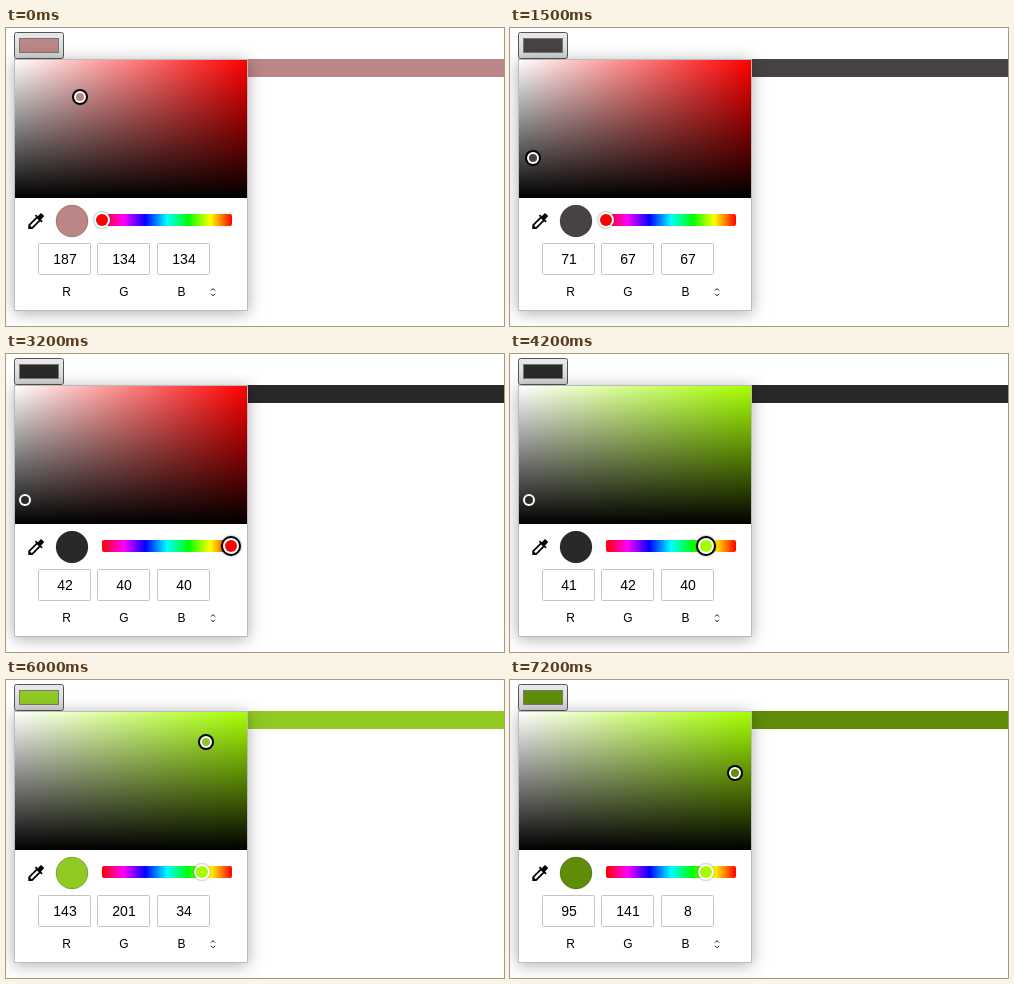
Write an HTML page that moves like this. It is 498 by 298 pixels and loops after 8000 ms.

```html
<!DOCTYPE html>
<html lang="en">
<head>
<meta charset="utf-8">
<title>Colour picker</title>
<style>
  html, body { margin: 0; width: 100%; height: 100%; overflow: hidden; background: #fff; }
  svg { display: block; }
  text { font: 14px "Liberation Sans", Arial, sans-serif; text-anchor: middle; }
  .label { font-size: 12px; }
  .panel { filter: drop-shadow(0 2px 8px rgba(0, 0, 0, .32)); }
  .tint { fill: var(--color); }
  .hue { fill: var(--hue); }
  .box { fill: #fff; stroke: #c4c4c4; }
  .knob { filter: drop-shadow(0 0 1px rgba(0, 0, 0, .5)); }
</style>
</head>
<body>
<svg id="stage" width="498" height="298" viewBox="0 0 498 298">
  <defs>
    <linearGradient id="white"><stop stop-color="#fff"/><stop offset="1" stop-color="#fff" stop-opacity="0"/></linearGradient>
    <linearGradient id="black" x2="0" y2="1"><stop stop-opacity="0"/><stop offset="1"/></linearGradient>
    <linearGradient id="rainbow"></linearGradient>
    <linearGradient id="button" x2="0" y2="1"><stop stop-color="#e9e9e9"/><stop offset="1" stop-color="#d6d6d6"/></linearGradient>
  </defs>

  <rect class="tint" x="8" y="31" width="490" height="18"/>
  <rect x="8.5" y="4.5" width="49" height="26" rx="2" fill="url(#button)" stroke="#555"/>
  <rect class="tint" x="13.5" y="10.5" width="39" height="14" stroke="#777"/>

  <rect class="panel" x="8" y="31" width="234" height="252" rx="1" fill="#bbb"/>
  <rect x="9" y="32" width="232" height="250" fill="#fff"/>
  <rect class="hue" x="9" y="32" width="232" height="138"/>
  <rect x="9" y="32" width="232" height="138" fill="url(#white)"/>
  <rect x="9" y="32" width="232" height="138" fill="url(#black)"/>

  <path transform="translate(19.7 182.7) scale(.87)" d="M20.71 5.63l-2.34-2.34c-.39-.39-1.02-.39-1.41 0l-3.12 3.12-1.93-1.91-1.41 1.41 1.42 1.42L3 16.25V21h4.75l8.92-8.92 1.42 1.42 1.41-1.41-1.92-1.92 3.12-3.12c.4-.4.4-1.03.01-1.42zM6.92 19L5 17.08l8.06-8.06 1.92 1.92L6.92 19z"/>
  <circle class="tint" cx="66" cy="193" r="16" stroke="#000" stroke-opacity=".22"/>
  <rect x="96" y="186" width="130" height="12" rx="2" fill="url(#rainbow)"/>

  <g id="fields"></g>
  <path d="M205 262.6l2-2 2 2M205 265.8l2 2 2-2" fill="none" stroke="#111"/>

  <g id="hueKnob" class="knob">
    <circle class="ring" r="10"/><circle r="8" fill="#fff"/><circle class="hue" r="6"/>
  </g>
  <g id="picker">
    <circle class="ring" r="8"/><circle r="6" fill="#fff"/><circle class="tint" r="4"/>
  </g>
</svg>
<script>
const $ = id => document.getElementById(id);
const LOOP = 8000, STEP = 100;
const HUE_CLICK = 2700, AREA_CLICK = 5100;

$('rainbow').innerHTML = Array.from({ length: 7 }, (_, i) =>
  `<stop offset="${i / 6}" stop-color="hsl(${360 - i * 60},100%,50%)"/>`).join('');

$('fields').innerHTML = ['R', 'G', 'B'].map((name, i) => {
  const x = Math.round(32 + 59.4 * i) + .5;
  return `<rect class="box" x="${x}" y="215.5" width="52" height="31" rx="1"/>
    <text class="value" x="${x + 26.5}" y="236"></text>
    <text class="label" x="${60.5 + 57.5 * i}" y="268">${name}</text>`;
}).join('');
const values = document.querySelectorAll('.value');

// Drag paths: time, x, y
const pickerPath = [
  [0, 74, 69], [600, 133.5, 114.5], [1500, 23, 130.4], [2000, 19, 146],
  [AREA_CLICK - STEP, 19, 146], [AREA_CLICK, 89.49, 112.49],
  [AREA_CLICK + STEP, 89.49, 112.49], [6000, 199.8, 62], [7200, 225.4, 93.4]
];
const huePath = [
  [HUE_CLICK - STEP, 96], [HUE_CLICK, 130], [2800, 130], [3200, 225], [4100, 225], [4200, 196]
];

function along(path, t) {
  const i = path.findIndex(key => key[0] > t);
  if (i < 1) return path.at(i).slice(1);
  const a = path[i - 1], b = path[i], p = (t - a[0]) / (b[0] - a[0]);
  return a.slice(1).map((v, j) => v + (b[j + 1] - v) * p);
}

function hsvToRgb(h, s, v) {
  return [5, 3, 1].map(n => {
    const k = (n + h / 60) % 6;
    return Math.round(255 * v * (1 - s * Math.max(0, Math.min(k, 4 - k, 1))));
  });
}

function place(id, x, y, focused) {
  $(id).setAttribute('transform', `translate(${Math.round(x)} ${Math.round(y)})`);
  $(id).querySelector('.ring').style.display = focused ? '' : 'none';
}

function draw() {
  const t = Math.floor(performance.now() % LOOP / STEP) * STEP;
  const [x, y] = along(pickerPath, t);
  const [hueX] = along(huePath, t);
  const hue = 360 * (225 - hueX) / 129;
  const rgb = hsvToRgb(hue, (x - 9) / 230, (168.2 - y) / 135);
  const hueFocused = t >= HUE_CLICK && t < AREA_CLICK;
  const style = $('stage').style;
  style.setProperty('--color', `rgb(${rgb})`);
  style.setProperty('--hue', `hsl(${hue},100%,50%)`);
  place('picker', x, y, !hueFocused);
  place('hueKnob', hueX, 192, hueFocused);
  rgb.forEach((v, i) => values[i].textContent = v);
  requestAnimationFrame(draw);
}
draw();
</script>
</body>
</html>
```
